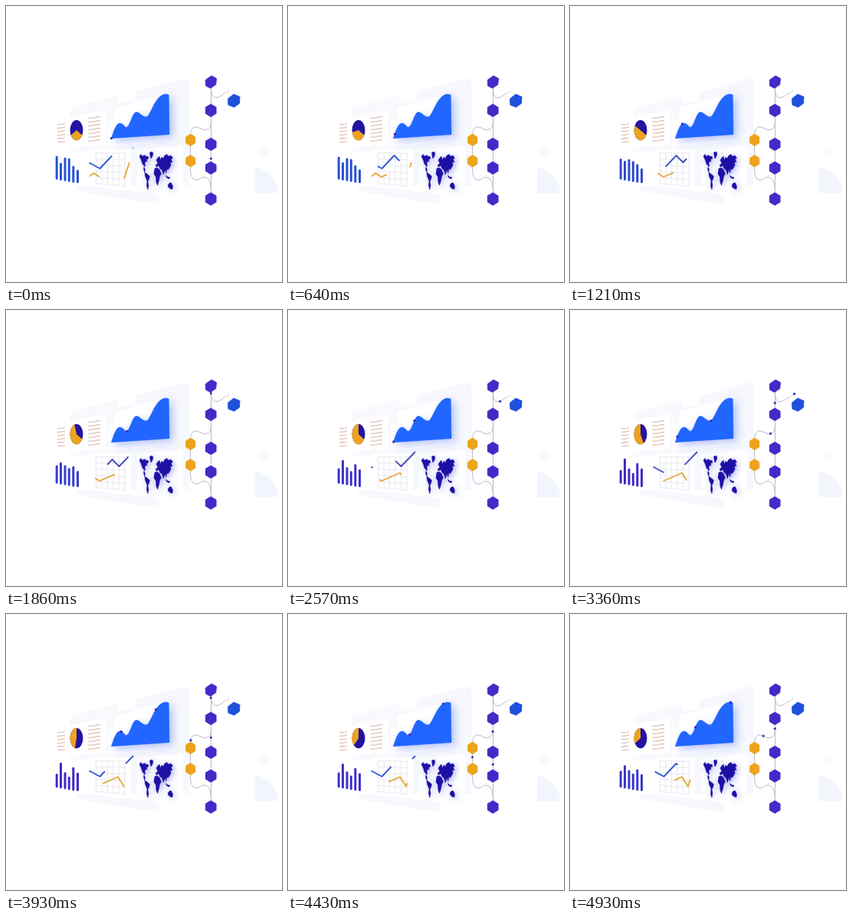
Write an HTML page that moves like this. It is 360 px wide and 360 px high and loops after 5 s.

```html
<!DOCTYPE html>
<html lang="en">
<head>
<meta charset="utf-8">
<title>Dashboard</title>
<style>
  html, body { margin: 0; width: 100%; height: 100%; overflow: hidden; background: #fff; }
  svg { display: block; width: 100vw; height: 100vh; }
  .pale { fill: #f6f8fd; }
  .card { fill: #fff; }
  .line { fill: none; stroke-width: 1.9; stroke-linejoin: round; }
  .wire { fill: none; stroke: #bcb6c8; stroke-width: 1; }
  .purple { fill: #4529c8; stroke: #4529c8; stroke-linejoin: round; }
  .amber { fill: #eea31d; }
  .hex { stroke-width: .9; stroke-linejoin: round; }
  .area { fill: #2166ff; stroke: #2166ff; stroke-width: .7; filter: drop-shadow(4px 4px 6px #4f6fe870); }
  .map { fill: #1d10a5; stroke: #1d10a5; stroke-width: .5; stroke-linejoin: round; filter: drop-shadow(2px 2px 4px #5a5ae880); }
</style>
</head>
<body>
<svg viewBox="0 0 360 360">
  <g class="pale">
    <path d="M83 138Q83 134 88 132L141 118Q147 117 147 123V190H83Z" opacity=".8"/>
    <path d="M168 112L232 95Q239 93 239 100V234H140V128L168 124Z"/>
    <path d="M95 233L196 246Q201 248 200 254Q199 259 194 258L96 242Q91 240 92 236Z"/>
    <path d="M325 210Q348 216 354.500 237Q356 244 350 244H325Z" fill="#f3f5fd"/>
    <circle cx="335" cy="190" r="7" opacity=".7"/>
  </g>

  <g class="card">
    <path d="M65 149L128 136Q131 136 131 139V181L65 187Z"/>
    <path d="M143 133L213 113V176L133 185V150L142 148Z"/>
    <path d="M60 192H101V235L60 229Z"/>
    <path d="M113 187H160Q163 187 163 190V235Q163 238 160 238L113 234Q110 234 110 231V190Q110 187 113 187Z"/>
    <path d="M174 188L228 183Q231 183 231 186V233Q231 236 228 236L174 241Q171 241 171 238V191Q171 188 174 188Z"/>
  </g>

  <g id="text" fill="none" stroke="#dcbcae" stroke-width="1.1"></g>
  <ellipse cx="92" cy="162" rx="8.5" ry="13.2" fill="#2414a0"/>
  <path id="slice" class="amber"/>

  <path class="area" d="M137.500 172.500C140.500 164 143.500 153 148.500 153C153.500 153 154.500 159.500 158 158C162.500 155 165 138.500 170 138.500C175 138.500 178 146 184 144.500C190 140 195 115 209 115L212.200 116L213 167.500Z"/>
  <path id="edge" fill="none" d="M137.500 172.500C140.500 164 143.500 153 148.500 153C153.500 153 154.500 159.500 158 158C162.500 155 165 138.500 170 138.500C175 138.500 178 146 184 144.500C190 140 195 115 209 115L212.200 116"/>
  <g id="edgeDots" fill="#3c22b4"></g>

  <g id="bars" stroke-width="3" stroke-linecap="round"></g>
  <g id="grid" stroke="#e2e2ee" stroke-width=".8"></g>
  <path id="blue" class="line" d="M108.500 204.500L122.500 212L138.500 195L147.500 204L166 185"/>
  <path id="gold" class="line" stroke="#e6a73c" d="M109 222L114.500 218L122 223L146 212.500L154 225L161 204"/>

  <g class="map">
    <path d="M174 196L176 193.500L178 196L181 194.500L183 196.500L185 196L186 199L183.500 200L184 203L182 202.500L181 206L182 209L180.500 209L178 206L176.500 201Z"/>
    <path d="M187.500 191L190.500 190L192 192.500L191 196L189 199L188 195Z"/>
    <path d="M180 210L181.500 213L181 217L179.500 213Z"/>
    <path d="M181 217L184 219L187.500 222L186.500 226L185 229L186 234L185 239.500L183.500 235L184 228L181.500 222Z"/>
    <path d="M196 201L198 198L200 196L201.500 201L203 197L205 199L207 195L210 193.500L212 196L215 195L217.500 198L215.500 200L217 204L214.500 203.500L215 208L212.500 212L211 214L209.500 212L209 218L207 214L205.500 220L203.500 214L201 212L199 208L196.500 210L195 208L198 205Z"/>
    <path d="M194 212L197 211L200 213L202.500 219L200.500 222L199.500 228L197.500 234L196 230L195.500 223L193 219Z"/>
    <path d="M211 234L213 231L215.500 230.500L217.500 235L217 239L214.500 238.500L212 236.500Z"/>
    <path d="M208.500 221L211 223L214 223.500L213 225.500L209.500 224Z"/>
  </g>

  <g class="wire">
    <path d="M267.500 105V251M240.500 170V208"/>
    <path d="M267.500 106C267.500 115 269 119.500 274 119.500C279 119.500 281 116 284 114.500"/>
    <path d="M284 114.500L291 110.500" stroke-dasharray="2 1"/>
    <path d="M267.500 150C267 157 266 160 262 161C256 163 253 158 248 158C243 157.500 241 161 240.500 168"/>
    <path d="M240.500 206C240 219 242 227 248 227C253 227 255 222 260 223.500C265 225 267 231 267.500 242"/>
    <g stroke="none">
      <path id="down" d="M267.300 105V215"/>
      <path id="arm" d="M267.300 106C267 115 269 119.500 274 119.500C279 119.500 281 116 284 114.500L293.500 109"/>
      <path id="side" d="M267.300 150C267 157 266 160 262 161C256 163 253 158 248 158C243 157.500 241 161 240.500 168V211"/>
    </g>
  </g>
  <g id="wireDots" fill="#3a32bb"></g>
  <g id="hexes"></g>
  <path class="hex" fill="#1f50dc" stroke="#1f50dc" d="M289.500 121L297 115L305 118.500L304.500 127L297.500 132L290 129Z"/>
  <path class="hex purple" d="M260.300 96.500L268 91L274.500 94.500L273.700 102.500L266.700 107.300L260.500 104Z"/>
</svg>
<script>
const LOOP = 5;
const $ = id => document.getElementById(id);
const mix = (a, b, p) => a + (b - a) * p;
const clamp = v => Math.min(1, Math.max(0, v));
const swing = v => (1 - Math.cos(Math.PI * v)) / 2;
const blend = (a, b, p) => `rgb(${a.map((v, i) => Math.round(mix(v, b[i], p)))})`;

function add(parent, name, attrs) {
  const el = document.createElementNS("http://www.w3.org/2000/svg", name);
  for (const key in attrs) el.setAttribute(key, attrs[key]);
  return $(parent).appendChild(el);
}

// Piecewise linear value from [time, value] pairs
function along(keys, t) {
  let i = 1;
  while (i < keys.length - 1 && t > keys[i][0]) i++;
  const [t0, v0] = keys[i - 1], [t1, v1] = keys[i];
  return mix(v0, v1, clamp((t - t0) / (t1 - t0)));
}

for (let i = 0; i < 6; i++) {
  const y = 155 + i * 4.6;
  add("text", "path", { d: `M67 ${y}l3 -.8l2 .3l5 -1.2` });
}
for (let i = 0; i < 7; i++) {
  const y = 146.5 + i * 5;
  add("text", "path", { d: `M107 ${y}l4 -.8l3 .3l4 -1.1l5 -.5` });
}
for (let i = 0; i < 6; i++) {
  const x = 117.5 + i * 7.5, y = 191.5 + i * 8;
  add("grid", "path", { d: `M${x} 191V${231 + i * .8}` });
  add("grid", "path", { d: `M117 ${y}L156 ${y + .5 + i * .6}` });
}

function hex(x, y, w, h, kind, stroke) {
  add("hexes", "path", {
    class: "hex " + kind, stroke,
    d: `M${x} ${y - h}l${w} ${h / 2}v${h}l${-w} ${h / 2}l${-w} ${-h / 2}v${-h}Z`
  });
}
[136.2, 180.4, 211.2, 251.7].forEach(y => hex(267.2, y, 6.9, 8.2, "purple", "#4529c8"));
[174.7, 202.2].forEach(y => hex(240.7, y, 6.1, 7.8, "amber", "#eea31d"));

// x, bottom, first top, second top
const bars = [
  [66.2, 225, 197, 210], [71.5, 226, 206, 195], [77, 227, 199, 208],
  [82.3, 228, 200, 214], [87.8, 229, 210, 201], [93.5, 229.5, 215, 208]
].map(([x, y, from, to]) => ({ from, to, el: add("bars", "line", { x1: x, x2: x, y1: y }) }));

const edgeDots = [0, 2.5].map(start => ({ start, el: add("edgeDots", "circle", { r: 1.6 }) }));
const edgeX = [[0, 137.5], [.86, 140], [1.86, 158], [2.57, 165], [3.36, 184], [3.93, 195.5], [5, 210.5]];

// path, start, end, start fraction, end fraction
const wireDots = [
  ["arm", 1.75, 3.4, 0, 1], ["down", 3.13, 4.7, 0, 1], ["down", 3.85, 5, .01, .43],
  ["side", 3.05, 4.98, 0, 1], ["side", 4.35, 5, 0, .31], ["down", 0, .25, .855, 1]
].map(([id, from, to, a, b]) => ({ path: $(id), from, to, a, b, el: add("wireDots", "circle", { r: 1.6 }) }));

function place(el, pt) {
  el.setAttribute("cx", pt.x);
  el.setAttribute("cy", pt.y);
}

function pointAtX(path, x) {
  let lo = 0, hi = path.getTotalLength();
  for (let i = 0; i < 14; i++) {
    const mid = (lo + hi) / 2;
    if (path.getPointAtLength(mid).x < x) lo = mid; else hi = mid;
  }
  return path.getPointAtLength(lo);
}

// Shows the stretch from tail to head, wrapping round the path ends
function trim(path, tail, head) {
  const all = path.getTotalLength(), len = head - tail;
  path.setAttribute("stroke-dasharray", `${len} ${all - len}`);
  path.setAttribute("stroke-dashoffset", -tail);
}

function rim(deg) {
  const a = deg * Math.PI / 180;
  return `${92 + 8.5 * Math.sin(a)} ${162 - 13.2 * Math.cos(a)}`;
}

const goldHead = [[0, 15.8], [1.21, 30], [1.86, 37.6], [2.57, 45], [3.36, 53.5], [3.93, 57], [5, 67]];
const goldTail = [[0, -22], [1.21, 6.8], [1.86, 8.8], [2.57, 12.5], [3.36, 15.5], [3.93, 20.5], [5, 32]];

function draw(t) {
  const from = 120 + 120 * swing(clamp(t / 2.5 - 1));
  const to = 240 + 120 * swing(clamp(t / 2.5));
  $("slice").setAttribute("d", `M92 162L${rim(from)}A8.5 13.2 0 ${to - from > 180 ? 1 : 0} 1 ${rim(to)}Z`);

  const p = swing(t / 3.55);
  for (const bar of bars) bar.el.setAttribute("y2", mix(bar.from, bar.to, p));
  $("bars").setAttribute("stroke", blend([39, 84, 211], [67, 41, 199], p));
  $("blue").setAttribute("stroke", blend([48, 92, 214], [72, 76, 182], swing(t / 2.5)));

  const head = 38.5 + 16.6 * t;
  trim($("blue"), head - 39.4, head);
  trim($("gold"), along(goldTail, t), along(goldHead, t));

  for (const { start, el } of edgeDots) {
    el.style.display = t < start ? "none" : "";
    if (t >= start) place(el, pointAtX($("edge"), along(edgeX, t - start)));
  }
  for (const { path, from, to, a, b, el } of wireDots) {
    const on = t >= from && t < to;
    el.style.display = on ? "" : "none";
    if (on) place(el, path.getPointAtLength(path.getTotalLength() * mix(a, b, (t - from) / (to - from))));
  }
}

function tick() {
  draw(performance.now() / 1000 % LOOP);
  requestAnimationFrame(tick);
}
tick();
</script>
</body>
</html>
```
